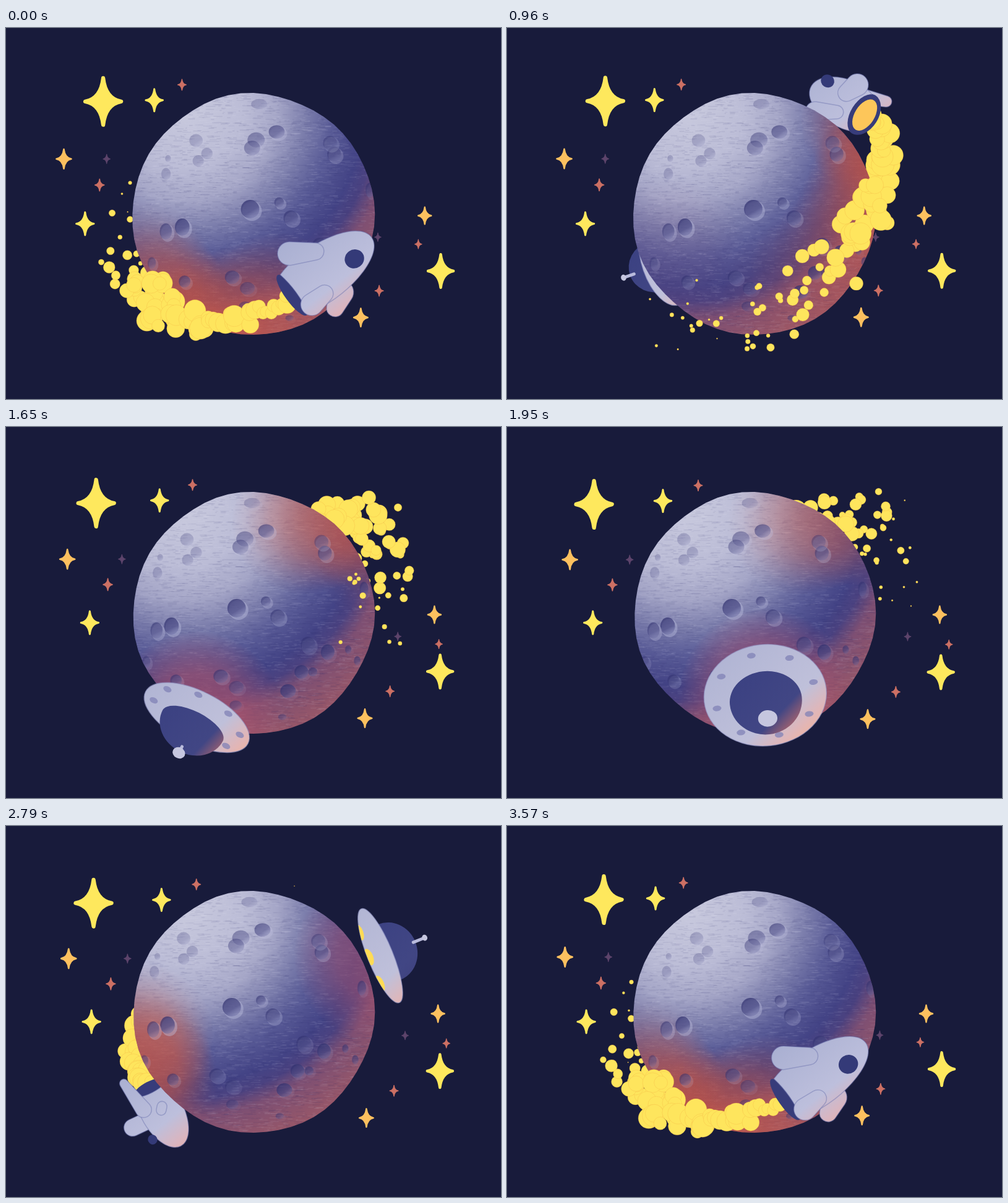
Animation of 800 by 600 pixels, one loop 3.6 s. Source, as an HTML page with a canvas:

```html
<!DOCTYPE html>
<html lang="en">
<head>
<meta charset="utf-8">
<title>Moon orbit</title>
<style>
html, body { margin: 0; width: 100%; height: 100%; overflow: hidden; background: #181b3b; }
canvas { display: block; width: 800px; height: 600px; }
</style>
</head>
<body>
<canvas id="stage" width="800" height="600"></canvas>
<script>
const LOOP = 3600, TAU = Math.PI * 2, RAD = Math.PI / 180;
const ctx = document.getElementById('stage').getContext('2d');
const mod = (a, n) => ((a % n) + n) % n;
const mix = (a, b, k) => a + (b - a) * k;
const clamp = (x, a = 0, b = 1) => Math.min(b, Math.max(a, x));

function random(seed) {
  return () => {
    seed = (seed + 0x6D2B79F5) | 0;
    let x = Math.imul(seed ^ (seed >>> 15), 1 | seed);
    x = (x + Math.imul(x ^ (x >>> 7), 61 | x)) ^ x;
    return ((x ^ (x >>> 14)) >>> 0) / 4294967296;
  };
}

// Periodic smooth curve through rows of [time, x, y, angle, ...]; one turn per loop.
function sample(keys, time) {
  const t = mod(time, LOOP), n = keys.length;
  const row = i => {
    const laps = Math.floor(i / n);
    return keys[mod(i, n)].map((v, c) => c === 0 ? v + laps * LOOP : c === 3 ? v - laps * 360 : v);
  };
  let i = 0;
  while (i < n - 1 && keys[i + 1][0] <= t) i++;
  const [p, a, b, q] = [row(i - 1), row(i), row(i + 1), row(i + 2)];
  const d = b[0] - a[0], k = (t - a[0]) / d, k2 = k * k, k3 = k2 * k;
  return a.map((v, c) => {
    const m = (b[c] - p[c]) / (b[0] - p[0]) * d, w = (q[c] - v) / (q[0] - a[0]) * d;
    return v * (2 * k3 - 3 * k2 + 1) + m * (k3 - 2 * k2 + k) + b[c] * (3 * k2 - 2 * k3) + w * (k3 - k2);
  });
}

function oval(x, y, rx, ry, fill, rot = 0) {
  ctx.beginPath();
  ctx.ellipse(x, y, Math.max(0, rx), Math.max(0, ry), rot, 0, TAU);
  ctx.fillStyle = fill;
  ctx.fill();
}

function glow(x, y, r, rgb, alpha) {
  const g = ctx.createRadialGradient(x, y, 0, x, y, r);
  g.addColorStop(0, `rgba(${rgb},${alpha})`);
  g.addColorStop(0.5, `rgba(${rgb},${alpha * 0.8})`);
  g.addColorStop(1, `rgba(${rgb},0)`);
  oval(x, y, r, r, g);
}

// ---- Stars: middle of the sway, reach of the sway, half height
const stars = {
  '#fee85d': [[150, 121.5, 12, -4.5, 41], [245, 118, -9, -2, 19.5], [132.5, 316.5, -8, 0, 20],
    [702, 394.5, 1, -2.5, 29]],
  '#fcc05f': [[97, 213, -6, -2, 17], [686.5, 303.5, -16.5, 0, 15], [577.5, 470, -7, -3, 16]],
  '#cc7064': [[295, 93, -18, -2, 9.5], [159.5, 254.5, -14, -1, 10.5], [687, 350.5, -35, -1.5, 8],
    [614, 426.5, -18.5, -2.5, 9.5]],
  '#5d446b': [[178, 213, -26, -2, 8], [621, 338.5, -34, -.5, 7.5]]
};

function drawStars(sway) {
  ctx.lineJoin = 'round';
  for (const [color, list] of Object.entries(stars)) {
    ctx.fillStyle = ctx.strokeStyle = color;
    for (const [mx, my, dx, dy, size] of list) {
      const x = mx + dx * sway, y = my + dy * sway, lw = size * .155;
      const w = size * .785 - lw / 2, h = size - lw / 2, cx = w * .13, cy = h * .12;
      ctx.beginPath();
      ctx.moveTo(x, y - h);
      ctx.quadraticCurveTo(x + cx, y - cy, x + w, y);
      ctx.quadraticCurveTo(x + cx, y + cy, x, y + h);
      ctx.quadraticCurveTo(x - cx, y + cy, x - w, y);
      ctx.quadraticCurveTo(x - cx, y - cy, x, y - h);
      ctx.closePath();
      ctx.lineWidth = lw;
      ctx.fill();
      ctx.stroke();
    }
  }
}

// ---- Moon
// Craters by strength: middle of the sway and radius
const craters = {
  .85: [[381, 293, 15], [274, 322, 14], [526, 364, 13], [484, 396, 12], [462, 427, 13]],
  .65: [[249, 329, 13], [428, 282, 8], [447, 307, 12], [427, 168, 13], [521, 204, 13], [354, 403, 12],
    [280, 410, 11], [495, 352, 13], [502, 396, 8], [558, 360, 7], [571, 378, 8], [582, 262, 12]],
  .5: [[393, 181, 14], [386, 194, 13], [515, 186, 13], [379, 421, 12], [377, 450, 10], [451, 469, 7],
    [230, 380, 10]],
  .3: [[402, 123, 13], [300, 215, 10], [314, 203, 10], [298, 182, 12], [250, 236, 10], [254, 211, 6]]
};
const tones = ['0 #c9cade', '.24 #bbbcd6', '.37 #a5a6c7', '.485 #7c7eac', '.6 #585a96',
  '.72 #434385', '.78 #4b4280', '.85 #7d4f73', '1 #985768'].map(s => s.split(' '));

const grain = document.createElement('canvas');
grain.width = grain.height = 440;
{
  const g = grain.getContext('2d'), rnd = random(5);
  for (let i = 0; i < 6000; i++) {
    g.fillStyle = rnd() < .5 ? 'rgba(235,235,255,.07)' : 'rgba(45,45,105,.08)';
    g.fillRect(rnd() * 440, rnd() * 440, 2 + rnd() * 14, 1 + rnd());
  }
}

function moonPath(sway) {
  ctx.beginPath();
  for (let i = 0; i < 60; i++) {
    const a = i / 60 * TAU;
    const r = 194.7 + Math.sin(a * 7 + 1) * .9 + Math.sin(a * 4 + 2.3) * 1.1;
    ctx.lineTo(400 + r * Math.cos(a) - sway * Math.max(0, -Math.cos(a)) * 1.5, 301 + r * Math.sin(a));
  }
  ctx.closePath();
}

function drawCrater(mx, my, size, s, sway) {
  const dx = mx - 400, dy = my - 300, squash = d => .35 + .65 * Math.sqrt(Math.max(0, 1 - (d / 196) ** 2));
  const depth = Math.sqrt(Math.max(0, 1 - (dx * dx + dy * dy) / 38416));
  const x = mx + sway * (4 + 19 * depth), y = my;
  const rx = size * squash(dx), ry = size * squash(dy);
  const lit = clamp((345 - Math.hypot(x - 290, y - 130)) / 130);
  oval(x + 3, y + 3, rx + 1, ry + 1, `rgba(190,192,222,${s * (.08 + .4 * lit)})`);
  const g = ctx.createLinearGradient(x - rx * .6, y - ry, x + rx * .6, y + ry);
  g.addColorStop(0, `rgba(46,46,108,${s * .85})`);
  g.addColorStop(.6, `rgba(62,62,124,${s * .75})`);
  g.addColorStop(1, `rgba(110,112,168,${s * .35})`);
  oval(x, y, rx, ry, g);
}

function drawMoon(t, sway) {
  ctx.save();
  moonPath(sway);
  ctx.clip();
  const g = ctx.createRadialGradient(290, 130, 0, 290, 130, 400);
  tones.forEach(([at, color]) => g.addColorStop(+at, color));
  ctx.fillStyle = g;
  ctx.fillRect(190, 90, 420, 420);
  ctx.drawImage(grain, 180 + sway * 12, 85);

  for (let age = 40; age < 1000; age += 90) {
    if (!burning(t - age)) continue;
    const [x, y] = tailAt(t - age);
    glow(x, y, 118, '218,88,58', .25 * (1 - age / 1500));
  }
  const u = sample(ufoKeys, t);
  if (u[4] > -.5) glow(u[1], u[2], 140, '174,82,106', .75 * clamp((u[4] + .5) * 2));

  for (const [s, list] of Object.entries(craters))
    for (const c of list) drawCrater(...c, +s, sway);
  ctx.restore();
}

// ---- Rocket
const rocketKeys = [
  [0, 515, 400, -36], [200, 583, 315, -55], [540, 607, 208, -80], [720, 597, 158, -108],
  [920, 550, 122, -143], [1100, 500, 126, -160], [1350, 430, 148, -170], [1800, 310, 220, -220],
  [2340, 212, 375, -270], [2790, 240, 465, -297], [3180, 340, 484, -352], [3400, 428, 456, -378],
  [3570, 503, 411, -395]
];
// Each view: tail u, v, half width, belly, nose u, v, ring depth; three fins (root and tip circles); window
const side = [-62, -5, 38, 46, 97, -5, 8, 10, -40, 14, -26, -62, 19, -18, 24, 14, -45, 26, 18,
  5, 38, 20, -18, 53, 14, 54, 7, 16];
const back = [-42, 3, 34, 38, 54, -2, 21, -3, -17, 11, 28, -34, 15, 0, 18, 14, -8, 38, 18,
  -32, 29, 12, -62, 40, 9, 36, 18, 11];
const front = [-40, -12, 27, 36, 66, -14, 8, 0, -12, 8, -5, -16, 8, -14, 13, 13, -66, 22, 7,
  5, 12, 14, 4, 42, 14, 36, 22, 8];
const views = [[0, side], [540, back], [1500, back], [2200, front], [2800, front], [3300, side], [3600, side]];

function viewAt(time) {
  const t = mod(time, LOOP), i = views.findIndex(v => v[0] > t);
  const [t0, a] = views[i - 1], [t1, b] = views[i];
  let k = (t - t0) / (t1 - t0);
  k = k * k * (3 - 2 * k);
  return a.map((v, j) => mix(v, b[j], k));
}

function tailAt(time) {
  const [, x, y, a] = sample(rocketKeys, time), v = viewAt(time), u = v[0] - 8;
  const c = Math.cos(a * RAD), s = Math.sin(a * RAD);
  return [x + u * c - v[1] * s, y + u * s + v[1] * c, c, s];
}

function lobe(x0, y0, r0, x1, y1, r1) {
  const a = Math.atan2(y1 - y0, x1 - x0), d = Math.hypot(x1 - x0, y1 - y0) || 1;
  const b = Math.acos(clamp((r0 - r1) / d, -1, 1));
  ctx.beginPath();
  ctx.arc(x0, y0, r0, a + b, a - b + TAU);
  ctx.arc(x1, y1, r1, a - b, a + b);
  ctx.closePath();
}

function drawRocket(t) {
  const [, x, y, deg] = sample(rocketKeys, t), v = viewAt(t);
  const [tu, tv, hw, bw, nu, nv, depth] = v;
  const a = deg * RAD, c = Math.cos(a), s = Math.sin(a);
  const local = (px, py) => [px * c + py * s, py * c - px * s];
  ctx.save();
  ctx.translate(x, y);
  ctx.rotate(a);
  const skin = ctx.createLinearGradient(...local(-55, -60), ...local(50, 75));
  skin.addColorStop(0, '#aab0d2');
  skin.addColorStop(.6, '#bdbfdc');
  skin.addColorStop(.82, '#dab5bf');
  skin.addColorStop(1, '#f0b09c');
  ctx.lineWidth = 1.5;
  ctx.strokeStyle = 'rgba(105,112,172,.45)';
  const paint = fill => { ctx.fillStyle = fill; ctx.fill(); ctx.stroke(); };
  const fin = i => { lobe(...v.slice(i, i + 6)); paint(skin); };

  fin(19);
  oval(tu, tv, depth + 3, hw + 2, '#373c7a');
  const len = nu - tu;
  ctx.beginPath();
  ctx.moveTo(tu + 4, tv - hw);
  ctx.bezierCurveTo(tu + len * .4, tv - bw * 1.25, nu, nv - bw * .8, nu, nv);
  ctx.bezierCurveTo(nu, nv + bw * .8, tu + len * .4, tv + bw * 1.25, tu + 4, tv + hw);
  ctx.quadraticCurveTo(tu + 12, tv, tu + 4, tv - hw);
  paint(skin);
  const [wu, wv, wr] = v.slice(25);
  oval(wu, wv, wr, wr * .94, '#343a78');
  if (depth > 9) {
    oval(tu, tv, depth, hw + 2, '#373c7a');
    oval(tu - 2, tv, depth - 5, hw - 6, '#fdc65a');
  }
  fin(7);
  fin(13);
  ctx.restore();
}

// ---- Smoke
const STEP = 12, rnd = random(21);
const puffs = Array.from({ length: LOOP / STEP }, (_, i) => {
  const a = rnd() * TAU, speed = .058 * Math.sqrt(rnd());
  return { born: i * STEP, dx: Math.cos(a) * speed, dy: Math.sin(a) * speed,
    side: (rnd() - .5) * 22, r: 10 + rnd() * 8.5, life: 1150 + rnd() * 330 };
});
const burning = t => { const e = mod(t, LOOP); return e < 1400 || e > 2350; };
const inFront = e => e > 2900 || e < 545;

function drawSmoke(t, wantFront) {
  const n = puffs.length, now = Math.floor(t / STEP);
  ctx.lineWidth = 1;
  ctx.strokeStyle = 'rgba(240,176,66,.3)';
  for (let i = 130; i >= 0; i--) {
    const p = puffs[mod(now - i, n)], age = mod(t - p.born, LOOP);
    if (age > p.life || !burning(p.born) || inFront(p.born) !== wantFront) continue;
    const [x, y, c, s] = tailAt(p.born);
    const grow = Math.min(1, .8 + age / 600);
    const r = p.r * grow * clamp((p.life - age) / (p.life - 560));
    if (r < .4) continue;
    oval(x - s * p.side + (p.dx - c * .018) * age, y + c * p.side + (p.dy - s * .018) * age, r, r, '#fee55d');
    ctx.stroke();
  }
}

// ---- Saucer: time, place, dome direction, how far the dome faces the viewer
const ufoKeys = [
  [0, 400, 260, 260, -.9], [540, 305, 310, 200, -.8], [900, 260, 370, 165, -.5],
  [1350, 234, 448, 139, -.1], [1650, 308, 470, 117, .42], [1950, 417, 434, 84, .82],
  [2340, 555, 332, 8, .7], [2790, 605, 210, -22, -.12], [3150, 500, 185, -60, -.6]
];

function drawUfo(t) {
  const [, x, y, deg, nz] = sample(ufoKeys, t);
  const tilt = Math.sqrt(Math.max(0, 1 - nz * nz)), face = Math.max(0, nz);
  const R = nz > 0 ? 86 + 16 * nz : 86 + 34 * nz, a = deg * RAD;
  const minor = Math.hypot(R * nz, 18 * tilt), domeR = R * .59;
  const c = Math.cos(a), s = Math.sin(a), local = (px, py) => [px * c + py * s, py * c - px * s];
  const dome = () => {
    const base = 16 * tilt, low = domeR * Math.abs(nz);
    ctx.beginPath();
    ctx.ellipse(base, 0, Math.hypot(low, 45 * tilt), domeR, 0, -Math.PI / 2, Math.PI / 2);
    ctx.ellipse(base, 0, low, domeR, 0, Math.PI / 2, Math.PI * 1.5);
    const g = ctx.createLinearGradient(...local(-40, -40), ...local(50, 45));
    g.addColorStop(0, '#3b4182');
    g.addColorStop(.75, '#414684');
    g.addColorStop(1, face > .3 ? '#a3626f' : '#3f427f');
    ctx.fillStyle = g;
    ctx.fill();
    ctx.strokeStyle = '#b9bbdc';
    ctx.lineWidth = 5;
    ctx.beginPath();
    ctx.moveTo(58 * tilt, 0);
    ctx.lineTo(76 * tilt, 0);
    ctx.stroke();
    const ball = 5 + 13 * face, at = mix(78, 66, clamp(face * 1.5)) * tilt;
    oval(at, 0, ball * .85, ball, '#c5c6df');
  };

  ctx.save();
  ctx.translate(x, y);
  ctx.rotate(a);
  ctx.lineCap = 'round';
  if (nz < .25) dome();
  const hull = ctx.createLinearGradient(...local(-60, -70), ...local(70, 75));
  hull.addColorStop(0, '#b1b5d4');
  hull.addColorStop(.65, '#bfc0da');
  hull.addColorStop(.86, '#e0b6b8');
  hull.addColorStop(1, '#f3b49b');
  oval(0, 0, minor, R, hull);
  ctx.strokeStyle = 'rgba(150,154,200,.6)';
  ctx.lineWidth = 1.5;
  ctx.stroke();
  if (nz < .2) {
    ctx.save();
    ctx.clip();
    for (const v of [-48, -5, 42]) oval(-minor * .88, v, 7, 14, '#fedb55');
    ctx.restore();
  } else {
    for (let i = 0; i < 8; i++) {
      const d = (i * 45 - 11) * RAD;
      oval(Math.sin(d) * minor * .82, -Math.cos(d) * R * .82, 4.5, 7, 'rgba(128,130,182,.75)');
    }
    dome();
  }
  ctx.restore();
}

function draw(t) {
  const sway = Math.cos((t - 540) / LOOP * TAU);
  const rocketFront = t < 570 || t > 2830, ufoFront = t > 1250 && t < 2760;
  const smokeOver = t > 260 && t < 900;
  const flight = isFront => {
    if (smokeOver && rocketFront === isFront) drawRocket(t);
    drawSmoke(t, isFront);
    if (!smokeOver && rocketFront === isFront) drawRocket(t);
  };
  ctx.fillStyle = '#181b3b';
  ctx.fillRect(0, 0, 800, 600);
  drawStars(sway);
  if (!ufoFront) drawUfo(t);
  flight(false);
  drawMoon(t, sway);
  flight(true);
  if (ufoFront) drawUfo(t);
}

const start = performance.now();
function tick() {
  draw((performance.now() - start) % LOOP);
  requestAnimationFrame(tick);
}
tick();
</script>
</body>
</html>
```
